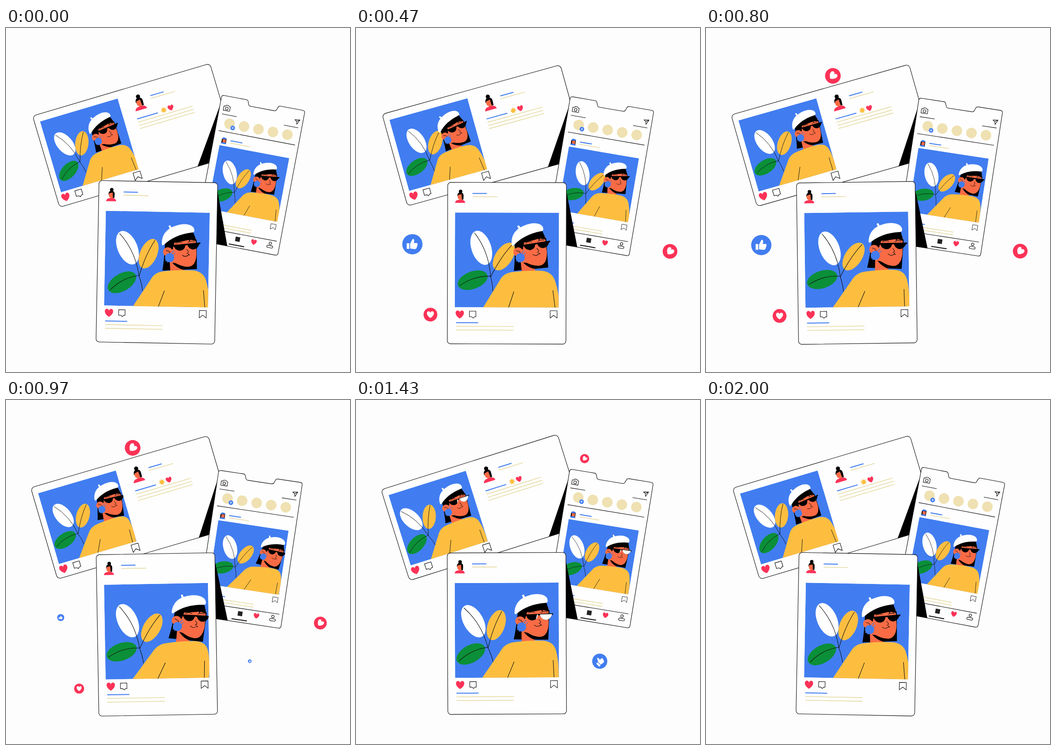
An HTML page for the animation above (2.03 s loop, 748 by 748 pixels).

```html
<!DOCTYPE html>
<html lang="en">
<head>
<meta charset="utf-8">
<title>Social posts</title>
<style>
html, body { margin: 0; width: 100%; height: 100%; overflow: hidden; background: #fdfdfd; }
svg { display: block; width: 100vw; height: 100vh; }
.line { fill: none; stroke: #111; stroke-width: 1.1; stroke-linecap: round; stroke-linejoin: round; }
.paper { fill: #fefefe; stroke: #111; stroke-width: 1.1; }
.blue { fill: none; stroke: #417df0; stroke-width: 2; }
.pale { fill: none; stroke: #e6dba4; stroke-width: 1.6; }
.skin { fill: #f96b45; }
.red { fill: #fb3257; }
.sun { fill: #fdbe40; }
</style>
</head>
<body>
<svg viewBox="0 0 748 748">
  <defs>
    <path id="phoneShape" d="M-87-160.2H-38Q-34-160.2-33-156.500L-31-151.500Q-30-147.800-26-147.800H26Q30-147.800 31-151.500L33-156.500Q34-160.2 38-160.2H87Q92-160.2 92-155V155Q92 160.2 87 160.2H-87Q-92 160.2-92 155V-155Q-92-160.2-87-160.2Z"/>
    <rect id="wideShape" x="-201" y="-103.5" width="402" height="207" rx="8"/>
    <clipPath id="wideClip"><use id="wideMask" href="#wideShape"/></clipPath>
    <clipPath id="phoneClip"><use id="phoneMask" href="#phoneShape"/></clipPath>
    <clipPath id="photoClip"><rect width="226" height="206"/></clipPath>

    <path id="heart" class="red" d="M0 .9C-1.25.1-1-.85-.45-.85Q-.1-.85 0-.45Q.1-.85.45-.85C1-.85 1.25.1 0 .9Z"/>
    <path id="bookmark" class="line" d="M-7.5-8H7.5V8L0 2L-7.5 8Z"/>
    <path id="comment" class="line" d="M-7-7H7V5H4L1 8L-2 5H-7Z"/>
    <path id="thumb" fill="#fff" d="M-.56-.1H-.3V.46H-.56ZM-.22-.05L.02-.52Q.22-.54.18-.27L.14-.12H.44Q.56-.08.51.08L.4.4Q.36.48.22.48L-.22.42Z"/>

    <g id="avatar">
      <circle cx="1" cy="-11" r="3.8"/>
      <path d="M-6-1Q-6-9 1-9Q8-8 7.5-1L7 7H2Z"/>
      <path class="skin" d="M-5-3L3-5L4 9H-2V6Q-6 6-5-3Z"/>
      <path class="red" d="M-11 14Q-10 8-3 7.5H5Q11 9 11 14Z"/>
    </g>

    <clipPath id="lensClip"><path id="lenses" d="M155 69H181Q180 81 169 82Q157 81 155 69ZM185 69L212 68Q208 80 198 81Q187 80 185 69Z"/></clipPath>

    <g id="photo" clip-path="url(#photoClip)">
      <rect width="226" height="206" fill="#417df0"/>
      <g id="plant">
        <g id="leafGreen">
          <ellipse rx="34" ry="19" transform="translate(36.5 151) rotate(-25)" fill="#0b8f38"/>
          <path class="line" d="M10 165Q38 141 75 139"/>
        </g>
        <g id="leafYellow">
          <ellipse class="sun" rx="18.5" ry="34" transform="translate(98 93) rotate(26)"/>
          <path class="line" d="M113 65Q91 95 75 140"/>
        </g>
        <ellipse rx="21.5" ry="38.5" transform="translate(48.5 79.5) rotate(-24)" fill="#fff"/>
        <path class="line" d="M31 49Q66 86 75 141Q81 157 83 172"/>
      </g>
      <g id="head">
        <path d="M137 62Q134 96 128 123L203 124L206 62L198 42L150 50Z"/>
        <path class="skin" d="M145 85H174V150H145Z"/>
        <path d="M150 107Q160 120 174 124V112Z"/>
        <path class="skin" d="M150 58L204 56L204 90Q202 117 185 118Q167 117 152 104Z"/>
        <path d="M143 60L199 42L205 63L191 59Q172 63 157 64L153 78L145 82Z"/>
        <path d="M188 59L190 63L193 59Z"/>
        <ellipse class="skin" cx="142" cy="83" rx="10.5" ry="10"/>
        <path class="line" d="M138 80Q146 81 147 87M160 66Q167 62 174 65M187 65Q194 61 201 64M183 80Q190 87 183 89M173 92Q179 98 187 92M186 90L189 93"/>
        <path d="M150 69L214 66.5L213 70L150 72Z"/>
        <use href="#lenses"/>
        <g clip-path="url(#lensClip)"><path id="glint" d="M-13 60H22L14 90H-21Z" fill="#fff"/></g>
        <path d="M149 28L154 38" stroke="#fff" stroke-width="4.5" stroke-linecap="round"/>
        <path d="M130 66C130 46 142 33 160 28C181 21 200 26 202 37C203 43 200 44 196 44C170 46 151 54 136 66C132 69 130 69 130 66Z" fill="#fff"/>
        <circle cx="145" cy="96" r="10" fill="#417df0"/>
        <path d="M135 103L155 81M139 106L158 86" stroke="#417df0" stroke-width="1.3"/>
      </g>
      <g id="body">
        <path class="sun" d="M60 206L98 148Q107 131 128 129Q160 125 190 126Q212 128 218 146Q226 170 226 206V212H60Z"/>
        <path class="line" d="M128 172L115 206M213 169L216 206"/>
      </g>
    </g>
  </defs>

  <rect width="748" height="748" fill="#fdfdfd"/>

  <g id="wide">
    <use href="#wideShape" class="paper"/>
    <use href="#photo" transform="translate(-189 -87.5) scale(.779)"/>
    <use href="#avatar" transform="translate(29.5 -66) scale(1.18)"/>
    <path class="blue" d="M57-73.2H87M15-32.8H62"/>
    <path class="pale" d="M56-67H111M15-25.3H139M15-18H139M15-11H139"/>
    <path id="star" class="sun" transform="translate(76 -35)"/>
    <use href="#heart" transform="translate(92 -35.5) scale(7)"/>
    <use href="#heart" transform="translate(-182 86) scale(10)"/>
    <use href="#comment" transform="translate(-152 86) scale(1.05)"/>
    <use href="#bookmark" transform="translate(-19 86) scale(1.05)"/>
  </g>

  <g clip-path="url(#wideClip)"><path id="phoneShade" d="M-89-155L-123 50H-70V-155Z"/></g>

  <g id="phone">
    <use href="#phoneShape" class="paper"/>
    <use href="#photo" transform="translate(-77 -52.5) scale(.6836)"/>
    <path class="line" d="M-84-120H-52M53-121H84M-84-83H84M-84 130H84"/>
    <path d="M-17 155H17" stroke="#111" stroke-width="2"/>
    <g id="stories" fill="#efe1b2"></g>
    <circle cx="-55.5" cy="-94.3" r="5" fill="#417df0"/>
    <path d="M-58-94.3H-53M-55.5-96.8V-91.8" stroke="#fff"/>
    <path class="line" d="M-83-138H-80L-78-140.5H-73L-71-138H-69V-128.5H-83Z"/>
    <circle class="line" cx="-76" cy="-133.5" r="3"/>
    <path class="line" d="M74-137L85-138.5L80-128L78.5-134ZM78.5-134L85-138.5"/>
    <g transform="translate(-69 -63.5)">
      <path d="M-5-4H5V5H-5Z"/><path class="skin" d="M-3-3H4V3Q0 6-3 3Z"/>
      <path d="M-5-3Q-4-8 1-7Q5-7 5-4ZM-6 7Q-5 3 0 3.5Q5 3 6 7Z" fill="#417df0"/>
    </g>
    <path class="blue" d="M-55-66H-29M-76 110H-38"/>
    <path class="pale" d="M-55-61H-11M-76 117H26M-76 123H26"/>
    <use href="#bookmark" transform="translate(71 100.5) scale(.73)"/>
    <rect x="-5" y="136.5" width="10" height="10" fill="#222"/>
    <use href="#heart" transform="translate(35.7 141) scale(6.7)"/>
    <circle class="line" cx="71.5" cy="137" r="2.8"/>
    <rect class="line" x="65" y="142" width="13" height="4.8" rx="2.4"/>
  </g>

  <g clip-path="url(#phoneClip)"><path id="frontShade" d="M126-172L166 30H100V-172Z"/></g>

  <g id="front">
    <rect class="paper" x="-129" y="-175.5" width="258" height="351" rx="7"/>
    <use href="#photo" transform="translate(-113 -110)"/>
    <use href="#avatar" transform="translate(-102 -145)"/>
    <path class="blue" d="M-75-151.5H-44M-110 129.5H-62"/>
    <path class="pale" d="M-75-144.5H-21M-110 137.5H15M-110 145.5H15"/>
    <use href="#heart" transform="translate(-102 111.5) scale(10)"/>
    <use href="#comment" transform="translate(-74 111.5)"/>
    <use href="#bookmark" transform="translate(102 111)"/>
  </g>

  <g id="badges"></g>
</svg>
<script>
const LOOP = 2030, TAU = Math.PI * 2;
const $ = id => document.getElementById(id);
const place = (id, transform) => $(id).setAttribute('transform', transform);
const clamp = v => Math.max(0, Math.min(1, v));
const smooth = v => { v = clamp(v); return v * v * (3 - 2 * v); };

// Smooth periodic curve through values at the given times.
const keyTimes = [0, 270, 630, 970, 1430, 1670];
function curve(values, t) {
  const n = keyTimes.length;
  const time = i => keyTimes[(i + n) % n] + Math.floor(i / n) * LOOP;
  const value = i => values[(i + n) % n];
  const slope = i => (value(i + 1) - value(i - 1)) / (time(i + 1) - time(i - 1));
  let i = n - 1;
  while (t < keyTimes[i]) i--;
  const span = time(i + 1) - time(i), u = (t - time(i)) / span, u2 = u * u, u3 = u2 * u;
  return (2 * u3 - 3 * u2 + 1) * value(i) + (u3 - 2 * u2 + u) * span * slope(i)
    + (3 * u2 - 2 * u3) * value(i + 1) + (u3 - u2) * span * slope(i + 1);
}

const headTurn = [-4.2, -9, -3.5, 6, 0, -6];
const headX = [0, 3, 5, 6, 0, 2];
const headY = [0, -4, -2.6, 2, 0, -1.7];

const badges = [
  { icon: 'thumb', x: 124, y: 469, dx: -5, dy: 4, r: 22, from: 73, to: 1070, turn: 0 },
  { icon: 'heart', x: 163, y: 621.5, dx: -4, dy: 6, r: 15, from: 128, to: 1134, turn: 0 },
  { icon: 'heart', x: 682.5, y: 486, dx: 1, dy: -1, r: 16, from: 195, to: 1164, turn: 38 },
  { icon: 'heart', x: 277, y: 104, dx: -3, dy: 0, r: 17, from: 460, to: 1400, turn: 42 },
  { icon: 'heart', x: 498, y: 127, dx: -2, dy: 1, r: 10, from: 1050, to: 1890, turn: 38 },
  { icon: 'thumb', x: 530, y: 568, dx: 0, dy: 0, r: 16.5, from: 893, to: 1845, turn: -45 }
];

$('badges').innerHTML = badges.map((b, i) => `<g id="badge${i}">
  <circle r="1" fill="${b.icon === 'heart' ? '#fb3257' : '#417df0'}"/>
  ${b.icon === 'heart' ? '<path d="' + $('heart').getAttribute('d') + '" fill="#fff" transform="scale(.56)"/>' : '<use href="#thumb"/>'}
</g>`).join('');

$('stories').innerHTML = [-64, -32, 0, 32, 64].map(x => `<circle cx="${x}" cy="-102" r="11.5"/>`).join('');

$('star').setAttribute('d', 'M' + Array.from({ length: 14 }, (_, i) => {
  const r = i % 2 ? 4 : 7, a = i * TAU / 14;
  return (r * Math.sin(a)).toFixed(2) + ' ' + (-r * Math.cos(a)).toFixed(2);
}).join('L') + 'Z');

function draw(t) {
  const p = t / LOOP * TAU, sin = Math.sin(p), cos = Math.cos(p);

  const wide = `translate(${277.9 + 2.1 * cos} 233.5) rotate(${-16.5 + sin})`;
  const phone = `translate(530 ${322.5 - 2.2 * cos}) rotate(${9.6 + 1.1 * cos})`;
  const front = `translate(328 ${509.5 + 2 * sin}) rotate(${0.05 + 1.03 * cos})`;
  ['wide', 'wideMask'].forEach(id => place(id, wide));
  ['phone', 'phoneMask', 'phoneShade'].forEach(id => place(id, phone));
  ['front', 'frontShade'].forEach(id => place(id, front));

  place('plant', `rotate(${5.4 * sin} 84 172)`);
  place('leafYellow', `rotate(${4.5 * Math.sin(p - 1.1)} 75 140)`);
  place('leafGreen', `rotate(${-6 * cos} 74 139)`);

  const turn = curve(headTurn, t);
  place('head', `translate(${curve(headX, t)} ${curve(headY, t)}) rotate(${turn} 190 160)`);
  place('body', `translate(${0.8 + 2.5 * Math.cos(p - 0.4)} 206) skewX(${-2 - 0.7 * turn}) translate(0 -206)`);
  place('glint', `translate(${194 + (t - 1430) * 0.35} 0)`);

  badges.forEach((b, i) => {
    const r = b.r * Math.min(smooth((t - b.from) / 250), smooth((b.to - t) / 250));
    const drift = (t - 270) / 700;
    const k = b.from < 300 ? drift : (t - b.from) / (b.to - b.from);
    place('badge' + i, `translate(${b.x + b.dx * k} ${b.y + b.dy * k}) rotate(${b.turn}) scale(${r})`);
    $('badge' + i).style.display = r > 0.1 ? '' : 'none';
  });
}

const start = performance.now();
function frame() {
  draw((performance.now() - start) % LOOP);
  requestAnimationFrame(frame);
}
frame();
</script>
</body>
</html>
```
